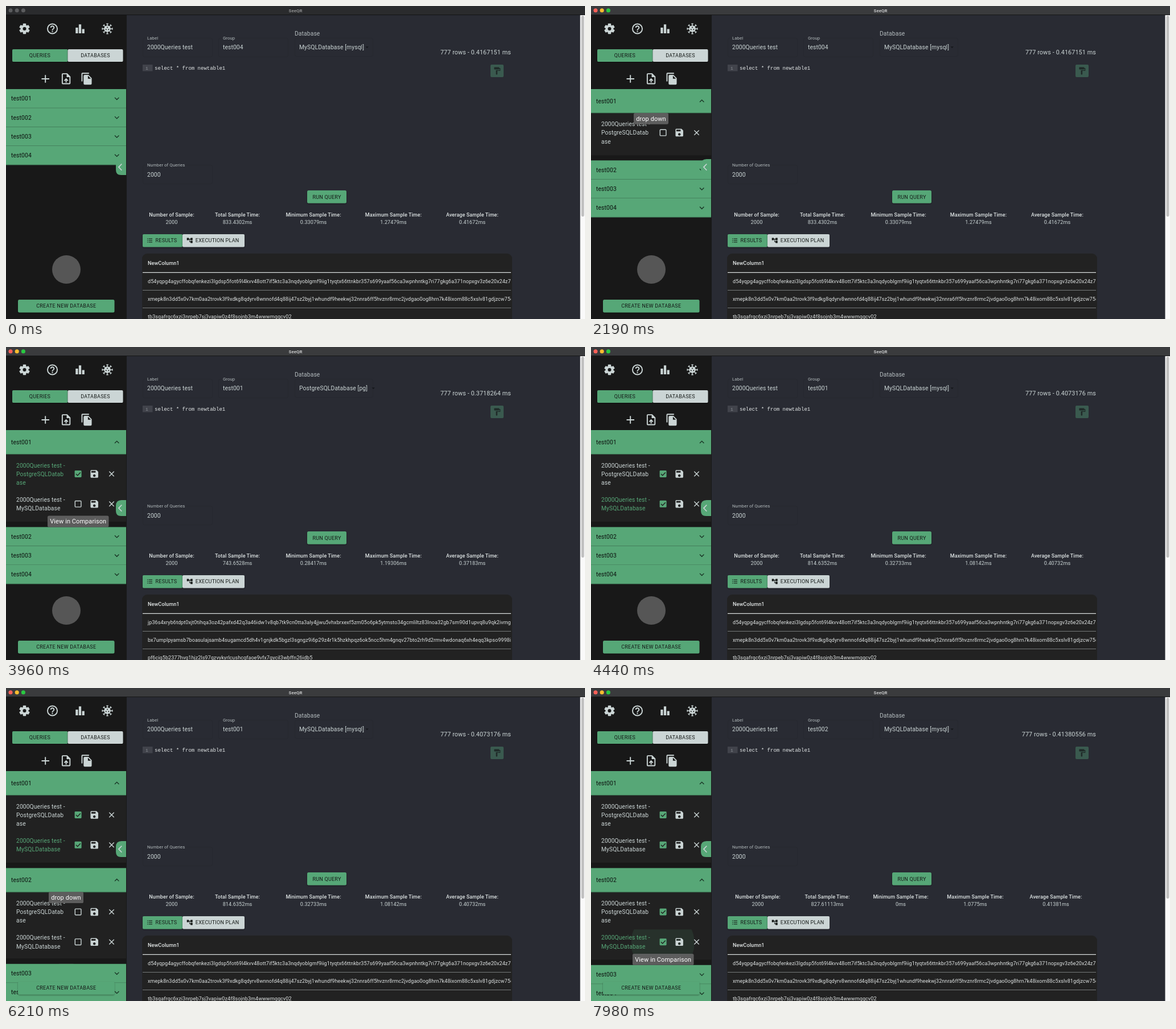
These frames come from a looping animation (1017 px wide and 550 px high, 8000 ms). An HTML page:

```html
<!DOCTYPE html>
<html lang="en">
<head>
<meta charset="utf-8">
<title>SeeQR</title>
<style>
html, body { margin: 0; width: 100%; height: 100%; overflow: hidden; background: #181818; }
svg { display: block; width: 1017px; height: 550px; font-family: Roboto, sans-serif; }
text { white-space: pre; }
.mono { font-family: "Liberation Mono", monospace; }
</style>
</head>
<body>
<svg viewBox="0 0 1017 550">
  <defs>
    <clipPath id="table"><rect x="240" y="435" width="647" height="115"/></clipPath>
    <filter id="shadow" x="-20%" y="-40%" width="140%" height="200%">
      <feDropShadow dx="0" dy="1.2" stdDeviation="1.2" flood-opacity=".4"/>
    </filter>
  </defs>
  <g id="base"></g><g id="main"></g><g id="side"></g><g id="front"></g><g id="tips"></g><g id="bar"></g>
</svg>
<script>
const GREEN = '#57a777', PALE = '#cbd5d5', DARK = '#181818', INK = '#141816';
const ROW = 33.3, TALL = 42.4, DETAILS = 118.6, GAP = 9.4, LIST_TOP = 146, SIDE = 211;
const LOOP = 8000;
const openings = [2080, 5984];
const presses = [3290, 3950, 6870, 7850];
const checkTips = [[3060, 3500], [3600, 4330], [6570, 7050], [7130, 9000]];
const dropTips = [[1830, 3320], [5670, 6900]];

const $ = id => document.getElementById(id);
const clamp = v => Math.max(0, Math.min(1, v));
const ramp = (t, start, length) => clamp((t - start) / length);

// Material standard curve, cubic-bezier(.4, 0, .2, 1)
function ease(x) {
  let lo = 0, hi = 1;
  for (let i = 0; i < 16; i++) {
    const s = (lo + hi) / 2;
    if (1.2 * s * (1 - s) ** 2 + .6 * s * s * (1 - s) + s ** 3 < x) lo = s; else hi = s;
  }
  return lo * lo * (3 - 2 * lo);
}

const rect = (x, y, w, h, fill, r = 0, more = '') =>
  `<rect x="${x}" y="${y}" width="${w}" height="${h}" rx="${r}" fill="${fill}" ${more}/>`;
const circle = (x, y, r, fill, more = '') => `<circle cx="${x}" cy="${y}" r="${r}" fill="${fill}" ${more}/>`;
const line = (d, color, width = 1, more = '') =>
  `<path d="${d}" fill="none" stroke="${color}" stroke-width="${width}" ${more}/>`;
const icon = (x, y, scale, d, fill = PALE) =>
  `<path transform="translate(${x} ${y}) scale(${scale}) translate(-12 -12)" d="${d}" fill="${fill}"/>`;
// y is the vertical middle of the capitals
const text = (x, y, str, size = 10.33, fill = PALE, more = '') =>
  `<text x="${x}" y="${y + size * .355}" font-size="${size}" fill="${fill}" letter-spacing="${size * .0094}" ${more}>${str}</text>`;
const middle = 'text-anchor="middle"', raised = 'filter="url(#shadow)"';
const caps = (x, y, str, fill = INK, more = middle) =>
  `<text x="${x}" y="${y + 3.2}" font-size="9" fill="${fill}" letter-spacing=".257" ${more}>${str}</text>`;

const SAVE = 'M17 3H5c-1.11 0-2 .9-2 2v14c0 1.1.89 2 2 2h14c1.1 0 2-.9 2-2V7l-4-4zm-5 16c-1.66 0-3-1.34-3-3s1.34-3 3-3 3 1.34 3 3-1.34 3-3 3zm3-10H5V5h10v4z';
const HELP = 'M11 18h2v-2h-2zM12 2a10 10 0 1 0 0 20 10 10 0 0 0 0-20zm0 18a8 8 0 1 1 0-16 8 8 0 0 1 0 16zM12 6c-2.21 0-4 1.79-4 4h2c0-1.1.9-2 2-2s2 .9 2 2c0 2-3 1.75-3 5h2c0-2.25 3-2.5 3-5 0-2.21-1.79-4-4-4z';
const UPLOAD = 'M14 2H6a2 2 0 0 0-2 2v16a2 2 0 0 0 2 2h12a2 2 0 0 0 2-2V8zm4 18H6V4h7v5h5zM8 15l1.4 1.4 1.6-1.6V19h2v-4.2l1.6 1.6L16 15l-4-4z';
const COPY = 'M16 1H4a2 2 0 0 0-2 2v14h2V3h12zM15 5l6 6v10a2 2 0 0 1-2 2H8a2 2 0 0 1-2-2V7a2 2 0 0 1 2-2zM14 12h5.5L14 6.5z';
const TREE = 'M22 11V3h-7v3H9V3H2v8h7V8h2v10h4v3h7v-8h-7v3h-2V8h2v3z';
const ROLLER = 'M18 4V3c0-.55-.45-1-1-1H5c-.55 0-1 .45-1 1v4c0 .55.45 1 1 1h12c.55 0 1-.45 1-1V6h1v4H9v11c0 .55.45 1 1 1h2c.55 0 1-.45 1-1v-9h8V4z';

function spokes(x, y, count, shape) {
  let out = '';
  for (let i = 0; i < count; i++)
    out += `<g transform="translate(${x} ${y}) rotate(${i * 360 / count})">${shape}</g>`;
  return out;
}

const mysqlRows = [
  'd54yqpg4agycffobqfenkezi3lgdsp5fot69l4kvv48ott7if5ktc3a3nqdyoblgmf9iig1tyqtx66ttnkbr357s699yaaf56ca3wpnhntkg7ri77gkg6a371nopxgv3z6e20x24z7k',
  'xmepk8n3dd5x0v7km0aa2trovk3f9xdkg8qdyrv8wnnofd4q88ij47sz2byj1whundf9heekwj32nnra6ff5hvznr8rmc2jvdgao0og8hrn7k48ixom88c5xslv81gdjzcw75q',
  'tb3sqafrqc6xzi3nrpeb7sj3vapiw0z4f8sojnb3m4wwwmqgcv02'];

function randomRow(seed, length) {
  let out = '';
  while (out.length < length) {
    seed = (seed * 16807) % 2147483647;
    out += (seed % 36).toString(36);
  }
  return out;
}
const pgRows = [randomRow(4021, 140), randomRow(977, 140), randomRow(31, 64)];

const centers = [291, 406.5, 540, 680.5, 819];
const mysql = { db: 'MySQLDatabase [mysql]', arrow: 634, rows: mysqlRows, centers };
const pg = { db: 'PostgreSQLDatabase [pg]', arrow: 645, rows: pgRows, centers };
const views = [
  { ...mysql, group: 'test004', time: '0.4167151', stats: ['833.4302', '0.33079', '1.27479', '0.41672'] },
  { ...pg, group: 'test001', time: '0.3718264', stats: ['743.6528', '0.28417', '1.19306', '0.37183'] },
  { ...mysql, group: 'test001', time: '0.4073176', stats: ['814.6352', '0.32733', '1.08142', '0.40732'] },
  { ...pg, group: 'test002', time: '0.3694105', stats: ['738.8210', '0.27965', '1.16458', '0.36941'] },
  { ...mysql, group: 'test002', time: '0.41380556', stats: ['827.61113', '0', '1.0775', '0.41381'],
    centers: [293, 415, 544, 675, 816.5] }];
const statNames = ['Number of Sample:', 'Total Sample Time:', 'Minimum Sample Time:', 'Maximum Sample Time:', 'Average Sample Time:'];

const field = (x, y, w, h) => rect(x + .5, y + .5, w, h, 'none', 3, 'stroke="#26282f"');

function drawBase() {
  const list = [0, 1, 2].map(i => `M248 ${409 + i * 3}h1.4M250.6 ${409 + i * 3}h6.4`).join('');
  $('base').innerHTML =
    rect(0, 0, 1017, 550, DARK) + rect(212, 16, 797, 534, '#292b33') +
    rect(1008.5, 16, 9, 534, '#fafafa') + rect(1010.5, 17, 5, 353, '#c1c1c1', 2.5) +
    // toolbar
    `<circle cx="32.5" cy="40" r="5" fill="none" stroke="${PALE}" stroke-width="4"/>` +
    spokes(32.5, 40, 6, rect(-2.7, -9.3, 5.4, 4, PALE, .8)) +
    icon(81.5, 40, .95, HELP) +
    rect(122.3, 38, 4.2, 10, PALE) + rect(127.9, 32.3, 4.2, 15.7, PALE) + rect(133.6, 40.5, 4.2, 7.5, PALE) +
    circle(178, 40, 5.8, PALE) + spokes(178, 40, 8, line('M0-5V-8.8M-1.7-8.8H1.7', PALE, 1.4)) +
    spokes(178, 40, 3, circle(0, -2.6, 1, DARK)) +
    rect(11, 76, 97.5, 22, GREEN, 2, raised) + rect(108.5, 76, 97, 22, PALE, 2, raised) +
    caps(59.5, 87, 'QUERIES') + caps(157, 87, 'DATABASES') +
    line('M62.5 128h13.5M69.2 121.2v13.5', PALE, 1.9) +
    icon(105.6, 127.8, .96, UPLOAD) + icon(142, 127.7, .95, COPY) +
    circle(106, 463, 25, '#565656') +
    // query form
    field(240, 56, 122, 33) + field(373, 56, 122, 33) + field(507, 56, 137, 32) + field(240, 279, 122, 33) +
    text(248, 56.5, 'Label', 7.75, '#b4bcbe') + text(381, 56.5, 'Group', 7.75, '#b4bcbe') +
    text(507, 48.5, 'Database', 10.33, '#b4bcbe') + text(248, 279.5, 'Number of Queries', 7.75, '#b4bcbe') +
    text(248, 72.5, '2000Queries test') + text(248, 296, '2000') +
    rect(240, 103, 17.5, 11.5, '#41434b') +
    `<text class="mono" x="245" y="111.5" font-size="8" fill="#868b90">1</text>` +
    `<text class="mono" x="261" y="111.5" font-size="9" fill="#e4e8e8">select * from newtable1</text>` +
    rect(851, 103, 23, 22, '#3a5a4f', 2) + icon(862.5, 114, .64, ROLLER, '#1f2a28') +
    rect(529, 324, 69, 22.5, GREEN, 2.5, raised) + caps(563.5, 335.3, 'RUN QUERY') +
    // result tabs and table
    rect(240, 401, 70, 22.5, GREEN, 2, raised) + rect(310, 401, 109, 22.5, PALE, 2, raised) +
    line(list, INK, 1.2) + caps(262.5, 412, 'RESULTS', INK, '') +
    icon(322.7, 412, .5, TREE, INK) + caps(332.8, 412, 'EXECUTION PLAN', INK, '') +
    rect(239, 435, 650, 130, '#222222', 9) +
    text(249, 451.5, 'NewColumn1', 9.1, '#e4e8e8', 'font-weight="500"') +
    line('M240 468.3H887', '#d8dcdc', 1.2) + line('M240 499.5H887M240 530.5H887', '#75797a', 1);

  $('front').innerHTML =
    `<path d="M${SIDE} 269H203q-10 0-10 10v9q0 9 9 9h9z" fill="${GREEN}"/>` +
    line('M203.3 277.5l-5.4 5.6 5.4 5.6', PALE, 1.6) +
    rect(21, 516, 169.5, 22.5, GREEN, 2.5, raised) + caps(105.7, 527.2, 'CREATE NEW DATABASE');
}

let shown = -1;
function drawMain(index) {
  if (index === shown) return;
  shown = index;
  const v = views[index], a = v.arrow;
  const stats = ['2000', ...v.stats.map(s => s + 'ms')];
  $('main').innerHTML =
    text(381, 72.5, v.group) + text(515, 72.5, v.db) +
    `<path d="M${a - 2.5} 71.2h5.4l-2.7 2.8z" fill="#15171b"/>` +
    text(887, 81, `777 rows - ${v.time} ms`, 10.8, PALE, 'text-anchor="end"') +
    stats.map((s, i) =>
      text(v.centers[i], 367.3, statNames[i], 9, '#dde3e3', middle + ' font-weight="500"') +
      text(v.centers[i], 379.8, s, 9.1, PALE, middle)).join('') +
    `<g clip-path="url(#table)">${v.rows.map((s, i) => text(249, 483.5 + i * 31, s, 9, '#e0e4e4')).join('')}</g>`;
}

function summary(y, height, name, turn) {
  return rect(0, y, SIDE, height, GREEN) +
    line(`M0 ${y + height}H${SIDE}`, '#35654a', .8) +
    text(9, y + height / 2, name, 10.4, '#0c100e') +
    `<g transform="translate(194.7 ${y + height / 2}) rotate(${turn * 180})">${line('M-3.7-1.8L0 1.9 3.7-1.8', '#173022', 1.3)}</g>`;
}

function queryItem(y, lines, checkY, checked, active) {
  const box = checked
    ? rect(120.6, checkY - 6, 12, 12, GREEN, 1.4) + line(`M123 ${checkY}l2.7 2.7 5-5.2`, '#212121', 1.4)
    : rect(121.3, checkY - 5.3, 10.6, 10.6, 'none', 1, `stroke="${PALE}" stroke-width="1.4"`);
  return lines.map((s, i) => text(18, y + i * 15.2, s, 10.33, active ? GREEN : PALE)).join('') + box +
    icon(155.2, checkY, .75, SAVE) +
    line(`M181.3 ${checkY - 4.2}l8.4 8.4m0-8.4l-8.4 8.4`, PALE, 1.4);
}

function ripple(t, press, cy) {
  const age = t - press;
  if (age < 0 || age > 430) return '';
  const r = Math.min(60, 55 * (age / 130) ** 1.8);
  const clip = `ripple${press}`;
  return `<clipPath id="${clip}">${rect(71, cy - 22, 110, 46, '#000')}</clipPath>` +
    circle(126 - 3.5 * (1 - clamp(age / 130)), cy + 1.5, r, age < 100 ? '#fff' : GREEN,
      `opacity="${.12 * (1 - ramp(age, 130, 300))}" clip-path="url(#${clip})"`);
}

function tip(t, [start, end], leave, x, y, w, label) {
  const o = ease(ramp(t, start, 160)) * (1 - ramp(t, end, leave));
  if (!o) return '';
  const scale = .75 + .25 * Math.sqrt(o), cx = x + w / 2, cy = y + 9.9;
  return `<g opacity="${o}" transform="translate(${cx} ${cy}) scale(${scale}) translate(${-cx} ${-cy})">` +
    rect(x, y, w, 19.8, '#616161', 2.6, 'fill-opacity=".94"') + text(cx, cy, label, 10.95, '#fff', middle) + '</g>';
}

function drawSide(t) {
  const done = presses.filter(p => t >= p + 100).length;
  let y = LIST_TOP, side = '', tips = '';
  for (let i = 0; i < 4; i++) {
    const start = openings[i] ?? Infinity;
    const grow = ease(ramp(t, start, 150)), open = ease(ramp(t, start, 273));
    const turn = ease(ramp(t, start - 30, 150));
    const height = ROW + (TALL - ROW) * grow, depth = DETAILS * open;
    const top = y;
    y += height;
    if (open > 0) {
      const first = i * 2, id = `details${i}`;
      side += rect(0, y, SIDE, depth + GAP * grow, DARK) + rect(0, y, SIDE, depth, '#212121') +
        `<clipPath id="${id}">${rect(0, y, SIDE, depth, '#000')}</clipPath><g clip-path="url(#${id})">` +
        ripple(t, presses[first], y + 34.6) + ripple(t, presses[first + 1], y + 87.4) +
        queryItem(y + 19.6, ['2000Queries test -', 'PostgreSQLDatab', 'ase'], y + 34.6, done > first, done === first + 1) +
        queryItem(y + 80, ['2000Queries test -', 'MySQLDatabase'], y + 87.4, done > first + 1, done === first + 2) + '</g>';
    }
    side += summary(top, height, `test00${i + 1}`, turn);
    if (i < 2) {
      // the hint keeps its place until the panel has finished opening
      const hintY = (t < start + 285 ? top + ROW : y + depth) + 8.6;
      tips += tip(t, dropTips[i], 60, 75, hintY, 61, 'drop down') +
        [0, 1].map(k => tip(t, checkTips[i * 2 + k], 100, 73, y + 55.4 + k * 52.8, 107.5, 'View in Comparison')).join('');
    }
    y += depth + GAP * grow;
  }
  $('side').innerHTML = side;
  $('tips').innerHTML = tips;
  drawMain(done);
}

function drawBar(t) {
  const active = ramp(t, 1320, 120);
  const lights = ['#fe5f57', '#febc2e', '#28c840'];
  $('bar').innerHTML = rect(0, 0, 1017, 15.5, '#2a2b2d') + rect(0, 0, 1017, 15.5, '#3a3b3d', 0, `opacity="${active}"`) +
    line('M0 15.6H1017', '#111214', .8) +
    lights.map((c, i) => circle(8 + i * 11.2, 7.8, 3.5, '#5b5c5e') + circle(8 + i * 11.2, 7.8, 3.5, c, `opacity="${active}"`)).join('') +
    text(508.5, 7.8, 'SeeQR', 7.8, active > .5 ? '#c4c5c6' : '#8c8d8e', middle + ' font-weight="700"');
}

function frame() {
  const t = performance.now() % LOOP;
  drawSide(t);
  drawBar(t);
  requestAnimationFrame(frame);
}
drawBase();
frame();
</script>
</body>
</html>
```
